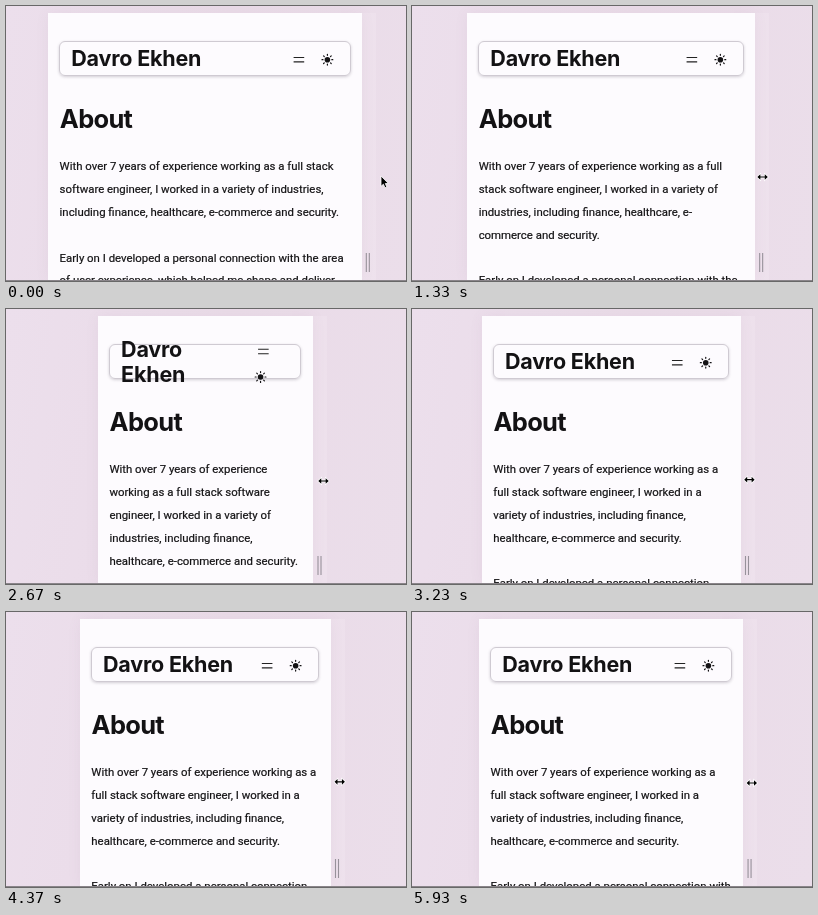
An HTML page for the animation above (6 s loop, 400x275 px).

```html
<!DOCTYPE html>
<html lang="en">
<head>
<meta charset="utf-8">
<title>Resizable page</title>
<style>
  html, body { margin: 0; width: 100%; height: 100%; overflow: hidden; }
  #stage {
    position: relative; width: 400px; height: 275px; overflow: hidden;
    background: linear-gradient(100deg, #ecdfec, #eadbe8 50%, #ebdeea);
    color: #131214;
  }
  #stage::after {
    content: ""; position: absolute; left: 0; right: 0; bottom: 0;
    height: 1px; background: #8a858a;
  }
  #page, #gutter { position: absolute; top: 7px; bottom: 0; }
  #page { background: #fdfbfe; box-shadow: 0 0 14px rgba(120, 80, 120, .06); }
  #gutter { width: 14px; background: rgba(255, 255, 255, .12); }
  #card {
    position: absolute; left: 11.4px; right: 11.4px; top: 28px; height: 35px;
    box-sizing: border-box; border: 1px solid #cfcad2; border-radius: 6px;
    box-shadow: 0 1px 3px rgba(40, 30, 50, .2);
  }
  #name, h1 { position: absolute; margin: 0; font-family: Inter, sans-serif; font-weight: 700; white-space: nowrap; }
  #name { left: 23.3px; top: 45.5px; transform: translateY(-50%); font-size: 21.5px; line-height: 25.4px; letter-spacing: -.2px; }
  #name.wrapped span { display: block; }
  h1 { left: 11.8px; top: 90.5px; font-size: 25.5px; line-height: 30px; letter-spacing: -.7px; }
  #copy {
    position: absolute; left: 11.6px; right: 10.8px; top: 142.1px;
    font: 11.4px/22.86px Roboto, sans-serif; -webkit-text-stroke: .2px;
  }
  #copy p { margin: 0 0 22.86px; }
  svg { position: absolute; left: 0; top: 0; }
</style>
</head>
<body>
<div id="stage">
  <div id="gutter"></div>
  <div id="page">
    <div id="card"></div>
    <div id="name"><span>Davro</span> <span>Ekhen</span></div>
    <h1>About</h1>
    <div id="copy">
      <p>With over 7 years of experience working as a full stack software engineer, I worked in a variety of industries, including finance, healthcare, e-commerce and security.</p>
      <p>Early on I developed a personal connection with the area of user experience, which helped me shape and deliver</p>
    </div>
  </div>
  <svg width="400" height="275" viewBox="0 0 400 275">
    <path id="menu" d="M-5.3-2.2H5.3M-5.3 2.2H5.3" stroke="#222" stroke-width="1.1"/>
    <g id="sun" stroke="#131214" stroke-width="1.2" stroke-linecap="round">
      <circle r="2.8" stroke="none" fill="#131214"/>
      <path id="rays"/>
    </g>
    <path id="grip" d="M-1.5 247V266M1.5 247V266" stroke="#97919a" stroke-width="1.1"/>
    <path id="arrow" d="M0 0V10.3L2.4 8.2 4 11.8 5.8 11 4.3 7.5H7.4Z" fill="#000" stroke="#fff" stroke-width=".8"/>
    <path id="resize" d="M-5.2 0L-2.2-2.8V-.6H2.2V-2.8L5.2 0 2.2 2.8V.6H-2.2V2.8Z" fill="#000" stroke="#fff" stroke-width="1.4" paint-order="stroke"/>
  </svg>
</div>
<script>
const LOOP = 6000;
const $ = id => document.getElementById(id);

// [ms, left edge of the page]
const drag = [
  [830, 42], [1330, 55], [1470, 61], [1830, 72], [2100, 81.5], [2670, 91.8],
  [2730, 91.8], [3330, 65.5], [3700, 56], [3870, 57.5], [4000, 61.5],
  [4630, 80.5], [4970, 85], [5170, 85], [5770, 70], [5930, 67], [LOOP, 67]
];
// [ms, cursor height]
const hover = [[30, 170], [330, 171], [1330, 171], [1830, 172], [2670, 172], [3870, 169], [4970, 171], [LOOP, 171]];

const slope = (a, b) => (b[1] - a[1]) / (b[0] - a[0]);

function tangent(keys, i) {
  if (i === 0 || i === keys.length - 1) return 0;
  const before = slope(keys[i - 1], keys[i]), after = slope(keys[i], keys[i + 1]);
  return before * after <= 0 ? 0 : 2 * before * after / (before + after);
}

// Monotone cubic interpolation
function sample(keys, t) {
  if (t <= keys[0][0]) return keys[0][1];
  const i = keys.findIndex(key => key[0] >= t);
  const [t0, v0] = keys[i - 1], [t1, v1] = keys[i];
  const span = t1 - t0, u = (t - t0) / span, w = 1 - u;
  return w * w * (1 + 2 * u) * v0 + u * u * (3 - 2 * u) * v1
    + span * u * w * (w * tangent(keys, i - 1) - u * tangent(keys, i));
}

const place = (id, x, y) => $(id).setAttribute("transform", `translate(${x} ${y})`);

$("rays").setAttribute("d", Array.from({ length: 8 }, (_, i) => {
  const c = Math.cos(i * Math.PI / 4), s = Math.sin(i * Math.PI / 4);
  return `M${4.4 * c} ${4.4 * s}L${5.4 * c} ${5.4 * s}`;
}).join(""));

function render(t) {
  const left = sample(drag, t), right = 398.4 - left, width = right - left;

  $("page").style.left = left + "px";
  $("page").style.width = width + "px";
  $("gutter").style.left = right + "px";

  // The pointer and the grip trail slightly as the page narrows
  const lag = left - 55;
  place("grip", right + 5.8 + 0.03 * lag, 0);

  const wrapped = left > 82;
  $("name").classList.toggle("wrapped", wrapped);
  if (wrapped) {
    const x = left + 165.7 + 0.7 * (width - 215);
    place("menu", x, 42.5);
    place("sun", x - 2.8, 68);
  } else {
    place("menu", right - 63.5, 53.7);
    place("sun", right - 35, 53.7);
  }

  const y = sample(hover, t), approach = Math.min(1, Math.max(0, (t - 30) / 300));
  const resizing = approach > 0.6;
  $("arrow").style.display = resizing ? "none" : "";
  $("resize").style.display = resizing ? "" : "none";
  place("arrow", 375 - 11 * approach, y);
  place("resize", right + 7.2 + 0.1 * lag + 4 * (1 - approach), y);
}

function tick() {
  render(performance.now() % LOOP);
  requestAnimationFrame(tick);
}
tick();
</script>
</body>
</html>
```
